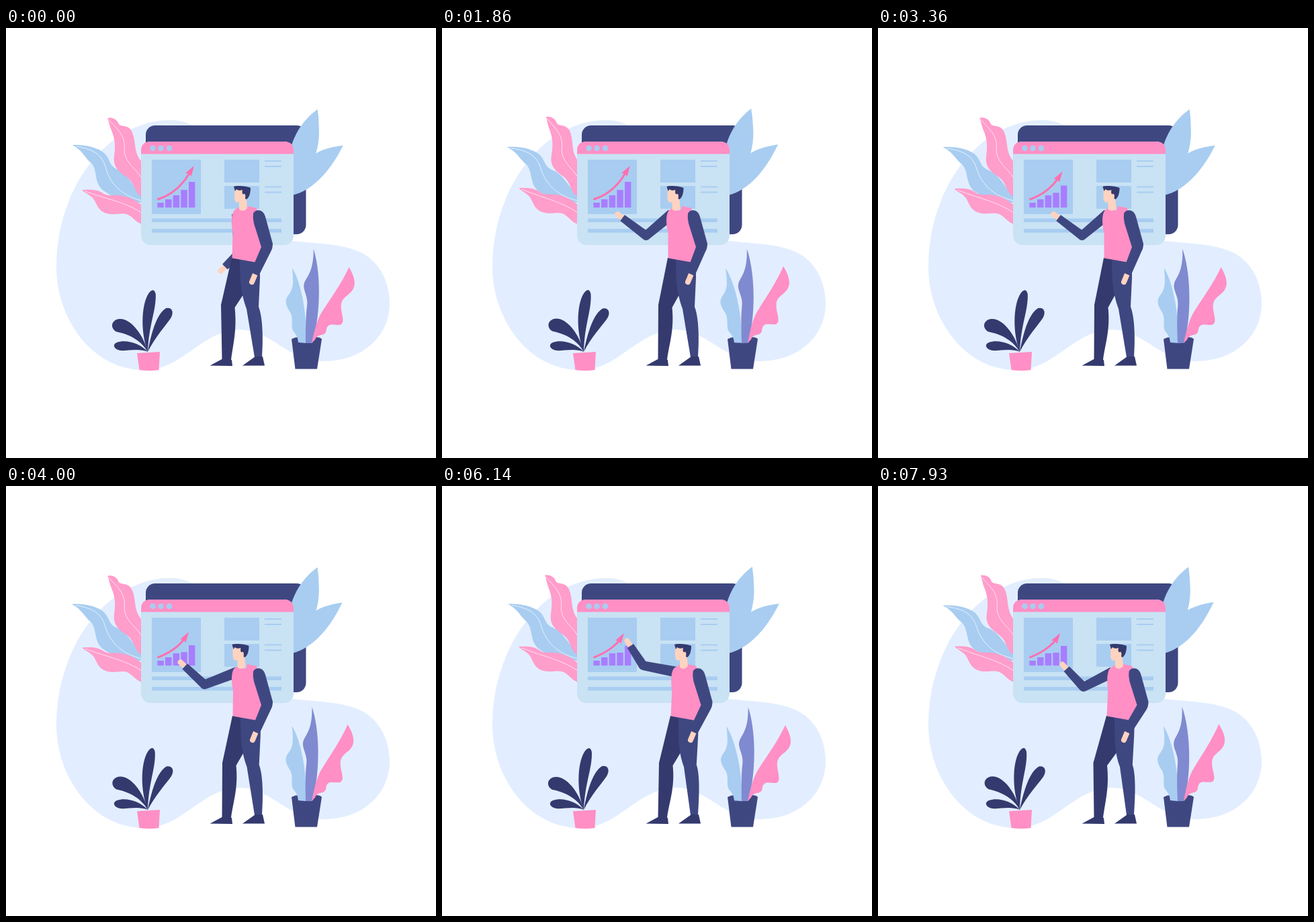
An HTML page that plays this animation: 640x640 px, repeating every 8000 ms.

```html
<!DOCTYPE html>
<html lang="en">
<head>
<meta charset="utf-8">
<title>Presentation</title>
<style>
html, body { margin: 0; width: 100%; height: 100%; overflow: hidden; background: #fff; }
svg { display: block; width: 100%; height: 100%; }
.navy { fill: #3f4781; } .deep { fill: #343a6e; }
.pink { fill: #ff8fc5; } .rose { fill: #ff9dcb; }
.sky { fill: #a8cdf1; } .pale { fill: #c9e2f4; }
.skin { fill: #ffd3c0; } .violet { fill: #a97dff; }
.vein { fill: none; stroke: #fff; stroke-width: .7; }
.hand { fill: none; stroke: #ffd3c0; stroke-width: 8; stroke-linecap: round; }
</style>
</head>
<body>
<svg viewBox="0 0 640 640">
  <path fill="#e2eeff" d="M75 355C75 240 150 137 245 137C300 137 330 200 350 270C370 310 400 313 428 317C460 321 500 320 530 335C558 350 571 380 571 410C571 455 535 496 472 496C420 496 395 450 350 449C290 449 265 509 205 509C130 509 75 435 75 355Z"/>
  <rect class="navy" x="208" y="145" width="238.500" height="162" rx="14"/>

  <g id="rightTop"><path class="sky" d="M464 121C444 135 424 160 420 200L425 249C445 230 468 190 466 150Q466 135 464 121Z"/></g>
  <g id="rightLow"><path class="sky" d="M502 175C480 178 465 182 450 195L420 220V250C452 246 481 217 502 175Z"/></g>

  <g id="leftBlue">
    <path class="sky" d="M99 174C120 173 140 179 148 188C156 197 153 205 167 211C182 218 188 235 203 250V260C180 259 160 253 145 242C130 230 137 212 127 201C115 190 115 183 99 174Z"/>
    <path class="vein" d="M105 176C140 182 145 195 150 213C158 235 175 250 202 257"/>
  </g>
  <g id="leftTop">
    <path class="rose" d="M151 134C158 132 165 136 167 142C170 148 180 143 186 152C195 168 188 185 203 200V252C190 245 193 232 180 222C165 212 159 205 161 190C164 170 160 160 155 148Z"/>
    <path class="vein" d="M152 136C165 150 178 160 176 180C175 200 195 210 202 224"/>
  </g>
  <g id="leftLow">
    <path class="rose" d="M113 241C125 240 135 240 143 245C152 252 160 247 172 249.500C190 253 195 259 203 264V292C195 290 192 285 185 280C175 272 165 280 150 276C135 272 135 258 128 252C123 247 118 246 113 241Z"/>
    <path class="vein" d="M118 243C150 255 175 258 202 275"/>
  </g>

  <rect class="pale" x="201" y="169" width="227" height="154" rx="14"/>
  <path class="pink" d="M201 187.500V183Q201 169 215 169H414Q428 169 428 183V187.500Z"/>
  <g class="sky">
    <circle cx="218.500" cy="179" r="4.300"/><circle cx="230.500" cy="179" r="4.300"/><circle cx="243" cy="179" r="4.300"/>
    <path d="M217 196h73v81h-73zM325 196h52v34h-52zM325 235h52v34h-52zM217 283.500h193v5.500h-193zM217 299h193v5.500h-193z"/>
    <path d="M385 197h25v2h-25zM385 205h25v2h-25zM385 235.500h25v2h-25zM385 243.500h25v2h-25z"/>
  </g>
  <path id="bars" class="violet"/>
  <path id="curve" fill="none" stroke="#ff6fb0" stroke-width="3" stroke-linecap="round"/>
  <path id="arrow" fill="#ff6fb0"/>

  <g class="deep">
    <g id="sproutTop"><path d="M211 482C199 450 202 405 215 392Q221 387 223 396C224 420 213 440 211 482Z"/></g>
    <g id="sproutRight"><path d="M211 482C217 450 225 425 238 417C248 415 250 424 245 432C236 445 222 460 211 482Z"/></g>
    <g id="sproutLeft"><path d="M211 482C200 463 180 455 164 452C154 446 157 434 169 433C185 432 204 455 211 482Z"/></g>
    <path d="M211 482C198 476 180 481 170 480C160 478 158 471 165 468C180 463 200 470 211 482Z"/>
  </g>
  <path class="pink" d="M195 484L229 482L227.500 509Q213 511 198.500 509Z"/>

  <path class="navy" d="M425 463Q430 460 436 460H460Q468 460 470 463L463 507.500H430.500Z"/>
  <g id="potBlue"><path class="sky" d="M426 357C440 380 449 430 446 469L435 468C434 460 433 458 428 452C423 445 428 435 424 425C418 415 413 407 420 398C428 388 428 380 426 357Z"/></g>
  <g id="potViolet"><path fill="#808ad0" d="M458 329C468 360 470 420 456 469H446C446 450 446 430 448 415C451 400 441 390 444 380C447 370 458 365 458 329Z"/></g>
  <g id="potPink"><path class="pink" d="M511 356C514 362 520 372 519 382C517 398 500 398 499 412C498 425 506 437 498 442C488 443 480 438 477 448C476 462 465 452 460 464L455 469C460 445 465 430 472 420C485 400 500 380 511 356Z"/></g>

  <path id="farHand" class="hand"/>
  <path id="farSleeve" class="navy"/>
  <path id="farLeg" class="deep"/>
  <path id="nearLeg" class="navy"/>
  <path class="deep" d="M303.500 502.500L323 492L336 494L337 503ZM352 502.500L371 489H382L385 502.500Z"/>
  <path id="shirt" class="pink"/>
  <g id="head">
    <path class="skin" d="M340 240H358V254L358 257L359 268Q353 275 347 270V259Q341 262 340 253Z"/>
    <path class="deep" d="M339 236C343 234 358 235 364 238C364 246 362 252 358 255L356 254C357 250 356 246 354 247C352 249 351 244 352 241Q346 243 343 240L341 243Z"/>
  </g>
  <path id="nearHand" class="hand"/>
  <path id="nearSleeve" class="navy"/>
</svg>
<script>
const LOOP = 8000, STEP = 1000 / 14;
const el = id => document.getElementById(id);
const draw = (id, d) => el(id).setAttribute('d', d);

// Columns: time, head, shoulder, hip, knee, wrist shift, upper arm angle and length, forearm angle and length.
const POSES = [
  [0,     0,    0,   0,  0, 0,  88, 59, 136, 28],
  [1.21, -1.5, -1,   0,  1, 0, 102, 47, 195, 45],
  [1.75, -4.5, -2,   0,  2, 0, 140, 50, 217, 44],
  [3.45, -4.5, -2,   0,  2, 0, 140, 50, 217, 44],
  [4,    -2.5,  0,   1,  2, 1, 159, 52, 223, 40],
  [5.1,   7,    5.5, 4,  3, 4, 191, 51, 237, 35],
  [6.85,  7,    5.5, 4,  3, 4, 191, 51, 237, 35],
  [7.14,  7,    5.5, 4,  2, 3, 188, 50, 238, 32],
  [7.93,  6,    5.5, 4, .5, 0, 153, 49, 227, 37]
];
const CHART = [[0, 0], [2.2, 0], [2.57, .2], [4, .88], [4.5, 1]];

// Smooth interpolation without overshoot, so that holds stay still.
function sample(keys, t, col) {
  const last = keys.length - 1;
  if (t >= keys[last][0]) return keys[last][col];
  const i = keys.findIndex((k, n) => t < keys[n + 1][0]);
  const slope = n => n < 0 || n >= last ? 0 :
    (keys[n + 1][col] - keys[n][col]) / (keys[n + 1][0] - keys[n][0]);
  const tangent = n => {
    const a = slope(n - 1), b = slope(n);
    return a * b > 0 ? 2 * a * b / (a + b) : 0;
  };
  const span = keys[i + 1][0] - keys[i][0], u = (t - keys[i][0]) / span, v = 1 - u;
  return keys[i][col] * v * v * (1 + 2 * u) + keys[i + 1][col] * u * u * (3 - 2 * u)
    + span * (tangent(i) * u * v * v - tangent(i + 1) * u * u * v);
}

// 1 at the peak time, 0 half a period later.
const wave = (t, period, peak) => (1 + Math.cos(2 * Math.PI * (t - peak) / period)) / 2;
const turn = (id, angle, x, y) => el(id).setAttribute('transform', `rotate(${angle} ${x} ${y})`);

const polar = ([x, y], deg, len) => {
  const a = deg * Math.PI / 180;
  return [x + len * Math.cos(a), y + len * Math.sin(a)];
};
function taper(a, b, wa, wb) {
  const angle = Math.atan2(b[1] - a[1], b[0] - a[0]) * 180 / Math.PI;
  return `M${polar(a, angle - 90, wa)}L${polar(b, angle - 90, wb)}L${polar(b, angle + 90, wb)}L${polar(a, angle + 90, wa)}Z`;
}
const disc = ([x, y], r) => `M${x - r} ${y}a${r} ${r} 0 1 1 ${2 * r} 0a${r} ${r} 0 1 1 ${-2 * r} 0Z`;

function drawLeaves(t) {
  const slow = wave(t, 4.8, .3), mid = wave(t, 3.42, 1.96);
  const fast = wave(t, 3.35, -.35), blue = wave(t, 3.65, 0);
  turn('leftTop', 1.9 * mid, 203, 250);
  turn('leftBlue', -2.2 * (1 - slow), 203, 255);
  turn('leftLow', 2 * (1 - wave(t, 4.8, -.1)), 203, 277);
  turn('rightTop', -1.7 * mid, 425, 249);
  turn('rightLow', -1.8 * (1 - fast), 425, 249);
  turn('potBlue', -2 * (1 - blue), 441, 469);
  turn('potViolet', -2.4 * (1 - slow), 451, 469);
  turn('potPink', -1.9 * (1 - fast), 455, 469);
  turn('sproutTop', -1.3 * (1 - fast), 211, 482);
  turn('sproutRight', 1.2 * (1 - fast), 211, 482);
  turn('sproutLeft', 1 - fast, 211, 482);
}

function drawChart(t) {
  const drop = sample(CHART, t, 1);
  const tops = [260, 255, 249, 241 + 7 * drop, 229 + 9 * drop];
  draw('bars', tops.map((y, i) => `M${225.4 + 11.65 * i} ${y}h9.4V267.300h-9.4Z`).join(''));
  const x = 280 - 9 * drop, y = 205 + 14 * drop;
  draw('curve', `M226.500 254.800Q${255 - 5 * drop} 246 ${x - 7} ${y + 11}`);
  draw('arrow', `M${x} ${y}l-13 11l5.500 1l3 4Z`);
}

function drawPerson(t) {
  const [head, s, h, k, w, upper, upperLen, fore, foreLen] =
    POSES[0].slice(1).map((_, i) => sample(POSES, t, i + 1));
  const shoulder = [344 + s, 277];
  const elbow = polar(shoulder, upper, upperLen);
  const wrist = polar(elbow, fore, foreLen);
  draw('farSleeve', taper(shoulder, elbow, 8, 6.8) + disc(elbow, 6.8) + taper(elbow, wrist, 6.8, 5.5));
  draw('farHand', `M${wrist}L${polar(wrist, fore, 9)}`);

  draw('farLeg', `M${336 + h} 342L${320 + k} 412L321.500 494H335C338 470 ${344 + k} 450 ${340.5 + k} 416L${353 + h / 2} 397L${356 + h} 343Z`);
  draw('nearLeg', `M${348 + h} 343C${348 + h} 380 ${350 + h / 2} 395 ${358 + h / 2} 418L370 490H381C383 460 ${382 + h / 2} 430 ${376 + h * .7} 415L${378 + h * .8} 372L${378 + h} 345Z`);
  draw('shirt', `M${336.5 + h} 342.500L${337.5 + (s + h) / 2} 305C${335 + s} 290 ${335 + s} 277 ${340 + s} 271L${348 + s} 266C${352 + s} 274 ${358 + s} 273 ${359 + s} 265L${373 + s} 268L${379 + s} 300L${380 + s} 327L${373 + h} 349Z`);
  el('head').setAttribute('transform', `translate(${head})`);
  draw('nearSleeve', `M${368 + s} 276C${371 + s} 269 ${383 + s} 269 ${386 + s} 281L${397 + s} 321Q${397 + s} 328 ${394 + s} 333L${376 + w} 369L${364 + w} 363.500L${380 + s} 326L${369 + s} 291Q${367 + s} 283 ${368 + s} 276Z`);
  draw('nearHand', `M${371 + w} 366L${366 + w} 378`);
}

function frame(now) {
  const t = Math.floor((now % LOOP + 5) / STEP) * STEP / 1000;
  drawLeaves(t);
  drawChart(t);
  drawPerson(t);
  requestAnimationFrame(frame);
}
requestAnimationFrame(frame);
</script>
</body>
</html>
```
